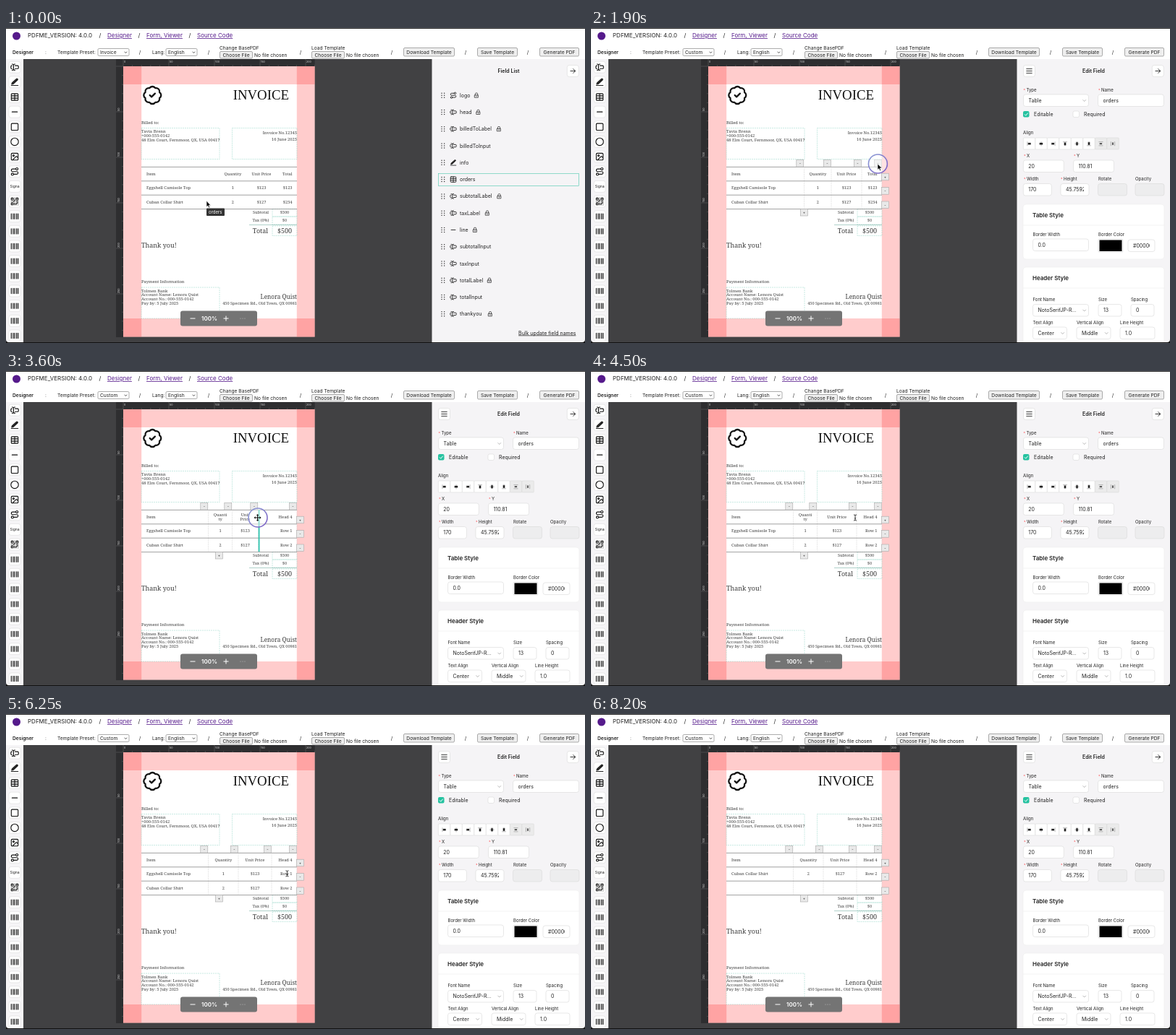
Recreate the animation shown at these times as an HTML page. Size 800 px wide and 436 px high, loop 8400 ms.

```html
<!DOCTYPE html>
<html lang="en">
<head>
<meta charset="utf-8">
<title>Invoice table editing</title>
<style>
  html, body { margin: 0; width: 100%; height: 100%; overflow: hidden; background: #fff; }
  svg { display: block; }
  text { font-family: Inter, "Liberation Sans", sans-serif; fill: #222; white-space: pre; }
  .serif text { font-family: "Noto Serif", "Liberation Serif", serif; fill: #3c3c3c; }
  .serif .title { font-family: "Liberation Serif", "Noto Serif", serif; fill: #111; }
  .bold { font-weight: 600; }
  .mid { text-anchor: middle; }
  .end { text-anchor: end; }
  .link { fill: #551a8b; text-decoration: underline; }
  .white { fill: #fff; }
  .pale { fill: #ddd; }
  .star { fill: #ff4d4f; }
  .icon { fill: none; stroke: #111; stroke-linecap: round; stroke-linejoin: round; }
  .solid { fill: #222; stroke: #222; }
  .dash { fill: none; stroke: #9bd8cc; stroke-width: .55; stroke-dasharray: 2 1; }
</style>
</head>
<body>
<svg id="stage" width="800" height="436" viewBox="0 0 800 436"></svg>
<script>
const LOOP = 8400, STEP = 50, TEAL = '#25c2a0';

// ---------- drawing helpers ----------
const text = (x, y, s, size = 7, cls = '') =>
  `<text x="${x}" y="${y}" font-size="${size}" class="${cls}">${s}</text>`;
const rect = (x, y, w, h, fill, stroke = 'none', r = 0, extra = '') =>
  `<rect x="${x}" y="${y}" width="${w}" height="${h}" fill="${fill}" stroke="${stroke}" stroke-width=".6" rx="${r}" ${extra}/>`;
const path = (d, stroke, width = .7, extra = '') =>
  `<path d="${d}" fill="none" stroke="${stroke}" stroke-width="${width}" ${extra}/>`;
const dot = (x, y, r, fill) => `<circle cx="${x}" cy="${y}" r="${r}" fill="${fill}"/>`;
const dash = (x, y, w, h) => `<rect x="${x}" y="${y}" width="${w}" height="${h}" class="dash"/>`;
const icon = (d, cx, cy, size, weight = 2, cls = '') =>
  `<path class="icon ${cls}" d="${d}" stroke-width="${weight}" transform="translate(${cx - size / 2} ${cy - size / 2}) scale(${size / 24})"/>`;
const ringPath = (x, y, r) => `M${x - r} ${y}a${r} ${r} 0 1 0 ${2 * r} 0a${r} ${r} 0 1 0 ${-2 * r} 0`;

const ICON = {
  text: 'M5 4h1a3 3 0 0 1 3 3 3 3 0 0 1 3-3h1M13 20h-1a3 3 0 0 1-3-3 3 3 0 0 1-3 3H5M5 16H4a2 2 0 0 1-2-2v-4a2 2 0 0 1 2-2h1M13 8h7a2 2 0 0 1 2 2v4a2 2 0 0 1-2 2h-7M9 7v10',
  pen: 'M3 21h18M16.5 3.5a2.1 2.1 0 0 1 3 3L8 17l-4 1 1-4Z',
  table: 'M5 3h14a2 2 0 0 1 2 2v14a2 2 0 0 1-2 2H5a2 2 0 0 1-2-2V5a2 2 0 0 1 2-2ZM3 9h18M3 15h18M12 3v18',
  line: 'M5 12h14',
  square: 'M5 3h14a2 2 0 0 1 2 2v14a2 2 0 0 1-2 2H5a2 2 0 0 1-2-2V5a2 2 0 0 1 2-2Z',
  circle: ringPath(12, 12, 10),
  route: ringPath(6, 19, 3) + ringPath(18, 5, 3) + 'M9 19h8.5a3.5 3.5 0 0 0 0-7h-11a3.5 3.5 0 0 1 0-7H15',
  grid: 'M3 3h5v5H3ZM16 3h5v5h-5ZM3 16h5v5H3ZM21 16h-3a2 2 0 0 0-2 2v3M12 7v3a2 2 0 0 1-2 2H7M12 3h.01M12 16v5M16 12h5M3 12h.01M21 21h.01',
  bars: 'M3 5v14M8 5v14M12 5v14M17 5v14M21 5v14',
  lock: 'M5 11h14v10H5ZM7 11V7a5 5 0 0 1 10 0v4M12 15v2',
  badge: 'M3.85 8.62a4 4 0 0 1 4.78-4.77 4 4 0 0 1 6.74 0 4 4 0 0 1 4.78 4.78 4 4 0 0 1 0 6.74 4 4 0 0 1-4.77 4.78 4 4 0 0 1-6.75 0 4 4 0 0 1-4.78-4.77 4 4 0 0 1 0-6.76ZM9 12l2 2 4-4',
  arrow: 'M4 12h16M13 5l7 7-7 7',
  menu: 'M3 5h18M3 12h18M3 19h18',
  down: 'M5 9l7 7 7-7'
};
ICON.image = ICON.square + ringPath(9, 9, 2) + 'M21 15l-3.1-3.1a2 2 0 0 0-2.8 0L6 21';
const glyph = (name, cx, cy, size, weight) => icon(ICON[name], cx, cy, size, weight, name === 'pen' ? 'solid' : '');

// ---------- page header ----------
function header() {
  const slash = (x, y, s) => text(x, y, '/', s, 'mid');
  const button = (x, y, w, h, label) =>
    rect(x, y, w, h, '#efefef', '#767676', 1.5) + text(x + w / 2, y + h / 2 + 2.4, label, 6.67, 'mid');
  const select = (x, label) =>
    rect(x, 28.5, 43, 10, '#fff', '#767676', 1.5) + label + icon(ICON.down, x + 38.5, 33.7, 5, 3.5);
  const file = (x, label) =>
    text(x, 30, label, 6.67) + button(x + .5, 32.5, 45, 9.5, 'Choose File') + text(x + 48, 40, 'No file chosen', 6.67);
  return rect(0, 0, 800, 43, '#fff')
    + dot(14.5, 11, 5.5, '#551a8b')
    + text(30, 13, 'PDFME_VERSION: 4.0.0', 8)
    + [130, 184, 254].map(x => slash(x, 13, 8)).join('')
    + text(140, 13, 'Designer', 8, 'link') + text(194, 13, 'Form, Viewer', 8, 'link') + text(264, 13, 'Source Code', 8, 'link')
    + text(9, 36, 'Designer', 6.67, 'bold') + text(54, 36, ':', 6.67) + text(71, 36, 'Template Preset:', 6.67)
    + select(127, '<text id="preset" x="130" y="36" font-size="6.67"></text>')
    + text(202, 36, 'Lang:', 6.67) + select(221, text(224, 36, 'English', 6.67))
    + [185, 280, 407, 533, 635, 721].map(x => slash(x, 36, 7)).join('')
    + file(295, 'Change BasePDF') + file(422, 'Load Template')
    + button(549.5, 27.5, 70, 11.5, 'Download Template')
    + button(651.5, 27.5, 55, 11.5, 'Save Template')
    + button(737.5, 27.5, 54, 11.5, 'Generate PDF');
}

// ---------- tool column ----------
function tools() {
  const names = ['text', 'pen', 'table', 'line', 'square', 'circle', 'image', 'route', '', 'grid'];
  let out = rect(0, 43, 24, 393, '#f6f5f7');
  for (let i = 0; i < 19; i++) {
    const y = 54.2 + i * 20.65;
    out += rect(4, y - 8, 16, 16, '#fff', '#dcdcdc', 3);
    out += i === 8 ? text(12, y + 1.8, 'Signa', 5, 'mid') : glyph(names[i] || 'bars', 12, y, 12.5, 2.2);
  }
  return out;
}

// ---------- canvas and invoice ----------
function rulers() {
  let out = rect(152, 43, 274.6, 10, '#2e2e30') + rect(152, 43, 10, 385, '#2e2e30'), ticks = '';
  for (let mm = 0; mm <= 295; mm += 10) {
    const d = mm * 1.26, big = mm % 50 === 0, len = big ? 10 : 2;
    if (mm <= 210) ticks += `M${162 + d} 53v${-len}`;
    ticks += `M162 ${53 + d}h${-len}`;
    if (big && mm <= 200) out += text(163 + d, 47.5, mm, 3.6, 'pale');
    if (big && mm) out += `<g transform="translate(156.5 ${52 + d}) rotate(-90)">${text(0, 0, mm, 3.6, 'pale')}</g>`;
  }
  return out + path(ticks, '#777', .4);
}

function invoice() {
  const lines = (x, y, gap, list) => list.map((s, i) => text(x, y + i * gap, s, 5.8)).join('');
  const pink = (x, y, w, h) => rect(x, y, w, h, 'rgba(255,0,0,.2)');
  return rect(24, 43, 565, 393, '#414143') + rulers()
    + rect(162, 53, 264.6, 374.5, '#fff')
    + pink(162, 53, 25.2, 374.5) + pink(401.8, 53, 24.8, 374.5) + pink(162, 53, 264.6, 25) + pink(162, 402, 264.6, 25.5)
    + dash(187, 138.5, 108, 43) + dash(312.5, 138.5, 89.5, 43) + dash(187, 359, 108, 43)
    + dash(368, 250.5, 34, 10.5) + dash(368, 261, 34, 11) + dash(368, 274, 34, 13.5)
    + path('M336 272.5H402', '#8fbdb4', .7)
    + icon(ICON.badge, 202.3, 93, 28.8, 1.9)
    + '<g class="serif">'
    + text(352.3, 98.5, 'INVOICE', 18.8, 'mid title')
    + text(187, 132.5, 'Billed to:', 5.8)
    + lines(187, 145, 6, ['Tavia Brenn', '+000-555-0142', '48 Elm Court, Fernmoor, QX, USA 00417'])
    + text(402, 147, 'Invoice No.12345', 5.8, 'end') + text(402, 155.7, '16 June 2025', 5.8, 'end')
    + text(352, 257.2, 'Subtotal', 5.6, 'mid') + text(352, 267.6, 'Tax (0%)', 5.6, 'mid') + text(351.5, 283.6, 'Total', 9, 'mid')
    + text(385, 257.2, '$500', 5.6, 'mid') + text(385, 267.6, '$0', 5.6, 'mid') + text(385, 283.6, '$500', 9, 'mid')
    + text(187, 304.3, 'Thank you!', 9)
    + text(187, 353, 'Payment Information', 5.8)
    + lines(187, 365.5, 5.9, ['Tolmen Bank', 'Account Name: Lenora Quist', 'Account No.: 000-555-0142', 'Pay by: 5 July 2025'])
    + text(402, 375, 'Lenora Quist', 8.2, 'end')
    + text(402, 383.2, '450 Specimen Rd., Old Town, QX 00981', 5.6, 'end')
    + '</g>';
}

function zoomBar() {
  return rect(241, 391.5, 106, 21, '#747474', 'none', 3)
    + path('M254.5 402h7M300.5 402h7M304 398.5v7', '#fff', 1)
    + text(281, 405, '100%', 8, 'mid bold white')
    + [324, 327, 330].map(x => dot(x, 402, .6, '#bbb')).join('');
}

// ---------- right panel ----------
const squareButton = (x, d) => rect(x, 51.5, 16, 16, '#fff', '#d9d9d9', 3) + icon(d, x + 8, 59.5, 10);

function fieldList() {
  // name, icon, x of the lock if there is one
  const fields = [['logo', 'route', 650], ['head', 'text', 652.5], ['billedToLabel', 'text', 681], ['billedToInput', 'text'],
    ['info', 'pen'], ['orders', 'table'], ['subtotalLabel', 'text', 681.5], ['taxLabel', 'text', 665], ['line', 'line', 648],
    ['subtotalInput', 'text'], ['taxInput', 'text'], ['totalLabel', 'text', 668], ['totalInput', 'text'], ['thankyou', 'text', 669]];
  return text(694.5, 62, 'Field List', 7, 'mid bold')
    + rect(597.5, 201.3, 194, 17, 'none', '#4cc9ae')
    + fields.map(([name, kind, lockX], i) => {
      const y = 93.2 + i * 23.28;
      let dots = '';
      for (let k = 0; k < 6; k++) dots += dot(602 + k % 2 * 3.6, y - 3 + (k >> 1) * 3, .75, '#333');
      return dots + glyph(kind, 618, y, 10) + text(627, y + 2.5, name) + (lockX ? glyph('lock', lockX, y, 8) : '');
    }).join('')
    + `<text x="787.5" y="424.5" font-size="7" class="end" text-decoration="underline">Bulk update field names</text>`;
}

function editForm() {
  const label = (x, y, s, star) => (star ? text(x, y, '*', 5, 'star') : '') + text(x + (star ? 4 : 0), y, s, 6);
  const input = (x, y, w, value, id = '') => rect(x, y, w, 16.5, '#fff', '#d9d9d9', 3)
    + `<svg x="${x}" y="${y}" width="${w - 7}" height="16.5" overflow="hidden"><text x="7" y="10.8" font-size="7" ${id && `id="${id}"`}>${value}</text></svg>`;
  const select = (x, y, w, value) => input(x, y, w, value) + path(`M${x + w - 8} ${y + 7.3}l2.2 2.2 2.2-2.2`, '#999', .7);
  const off = x => rect(x, 215.5, 40, 16.5, '#ededee', '#d9d9d9', 3);
  const card = (y, h, title) => rect(597, y, 195, h, '#fff', '#ececec', 4)
    + text(610, y + 17.7, title, 8, 'bold') + path(`M597 ${y + 29}H792`, '#eee');
  const aligns = ['M3 3v18M7 8h12v8H7Z', 'M12 2v20M5 8h14v8H5Z', 'M21 3v18M5 8h12v8H5Z', 'M3 3h18M8 7v12h8V7Z',
    'M2 12h20M8 5v14h8V5Z', 'M3 21h18M8 5v12h8V5Z', 'M3 3h18M3 21h18M7 10h10v4H7Z', 'M3 3v18M21 3v18M10 7v10h4V7Z'];
  return squareButton(597.5, ICON.menu) + text(694.5, 62, 'Edit Field', 7, 'mid bold')
    + label(597.5, 87.5, 'Type', 1) + select(597.5, 92, 90, 'Table')
    + label(701, 87.5, 'Name', 1) + input(700.5, 92, 91, 'orders')
    + rect(597, 115, 8.5, 8.5, TEAL, 'none', 2) + path('M599 119.4l1.7 1.8 3-3.6', '#fff', 1)
    + text(612, 122, 'Editable') + rect(666, 115, 8.5, 8.5, '#fff', '#d9d9d9', 2) + text(681, 122, 'Required')
    + label(597, 147.4, 'Align')
    + aligns.map((d, i) => rect(597.3 + i * 16.5, 152, 16.5, 16, i > 5 ? '#ebebeb' : '#fff', '#d9d9d9', 1)
      + icon(d, 605.5 + i * 16.5, 160.2, 7, 1, 'solid')).join('')
    + label(598, 178.5, 'X', 1) + input(597.3, 183, 56, '20')
    + label(667, 178.5, 'Y', 1) + input(666.5, 183, 56, '110.81')
    + label(598, 210.5, 'Width', 1) + input(597.3, 215.5, 39, '170')
    + label(649, 210.5, 'Height', 1) + input(649, 215.5, 39, '', 'height')
    + label(701, 210.5, 'Rotate') + off(700.5) + label(752, 210.5, 'Opacity') + off(752)
    + card(244, 76, 'Table Style')
    + label(610.5, 287.5, 'Border Width') + input(610.5, 292, 77, '0.0')
    + label(701, 287.5, 'Border Color') + rect(701, 292, 34, 18.5, '#fff', '#d9d9d9', 2) + rect(702.5, 293.5, 31, 15.5, '#000')
    + input(742, 293, 37, '#000000')
    + card(331, 110, 'Header Style')
    + label(610.5, 378, 'Font Name') + select(610.5, 382.5, 77, 'NotoSerifJP-R...')
    + label(701, 378, 'Size') + input(701, 382.5, 32, '13')
    + label(746, 378, 'Spacing') + input(746, 382.5, 32, '0')
    + label(610.5, 410, 'Text Align') + select(610.5, 414, 47, 'Center')
    + label(671, 410, 'Vertical Align') + select(671, 414, 47, 'Middle')
    + label(731, 410, 'Line Height') + input(731, 414, 48, '1.0');
}

// ---------- timeline ----------
const SELECT = 450, EDIT = 1100, CUT_COL = 2200, ADD_COL = 3050, DROP_A = 4000, DROP_B = 5750, CUT_ROW = 6700, ADD_ROW = 7600, GONE = 8200;
const LEFT = 187, RIGHT = 402, TOP = 192, ROW = 19.4;
const layouts = [[0, [294.5, 332, 374, RIGHT]], [CUT_COL, [310.5, 354, RIGHT]], [ADD_COL, [279.5, 312.5, 348.5, RIGHT]],
  [DROP_A, [279.5, 312.5, 367, RIGHT]], [DROP_B, [279.5, 321, 367, RIGHT]]];
// time, x, y, pointer shape
const moves = [[0, 277, 239.3, 'arrow'], [450, 278.3, 237, 'arrow'], [1400, 278.3, 237, 'arrow'], [1750, 396, 188, 'arrow'],
  [2250, 396, 188, 'arrow'], [2650, 406, 205, 'arrow'], [3100, 406, 205, 'arrow'], [3450, 346.5, 203, 'move'],
  [3550, 346.5, 203, 'move'], [3600, 347.6, 203, 'move'], [3900, 365, 203, 'move'], [4500, 365, 203, 'beam'],
  [5250, 309, 204, 'beam'], [5350, 309, 204, 'beam'], [5450, 314, 204, 'beam'], [5700, 317.5, 204, 'beam'],
  [6000, 317.5, 204, 'beam'], [6350, 406, 225, 'arrow'], [6950, 406, 225, 'beam'], [7100, 312, 228, 'beam'],
  [7250, 294, 235, 'arrow'], [LOOP, 294, 235, 'arrow']];
const presses = [[200, 300], [900, 950], [1000, 1100], [1850, 2100], [2800, 2950], [3550, 3950], [5350, 5700], [6400, 6550], [7350, 7500]];
// start, end, pointer x at the grab, column edge
const drags = [[3550, DROP_A, 346.5, 348.5], [5350, DROP_B, 309, 312.5]];

function pointerAt(t) {
  let i = 0;
  while (i < moves.length - 2 && t >= moves[i + 1][0]) i++;
  const a = moves[i], b = moves[i + 1], p = (t - a[0]) / (b[0] - a[0]), e = p * p * (3 - 2 * p);
  return { x: a[1] + (b[1] - a[1]) * e, y: a[2] + (b[2] - a[2]) * e, kind: a[3] };
}

function pointer(t, c) {
  if (t >= GONE) return '';
  let out = '';
  if (presses.some(([a, b]) => t >= a && t < b))
    out += `<circle cx="${c.x + .4}" cy="${c.y}" r="13" fill="#fff" fill-opacity=".45" stroke="url(#ring)" stroke-width="1.6"/>`;
  const shapes = {
    arrow: '<path d="M0 0V8.3L1.9 6.6 3.2 9.5 4.6 8.9 3.3 6.1H5.8Z" fill="#000" stroke="#fff" stroke-width=".6"/>',
    beam: path('M-2-4Q0-4 0-3Q0-4 2-4M0-3V3M-2 4Q0 4 0 3Q0 4 2 4M-1 1H1', '#222', .9),
    move: path('M-4 0H4M0-4V4', '#111', 1.1) + '<path d="M-5 0l2-1.7v3.4ZM5 0l-2-1.7v3.4ZM0-5l-1.7 2h3.4ZM0 5l-1.7-2h3.4Z" fill="#111"/>'
  };
  const fade = Math.min(1, (GONE - t) / 300);
  return `${out}<g transform="translate(${c.x} ${c.y})" opacity="${fade}">${shapes[c.kind]}</g>`;
}

function tableRows(t) {
  const last = t < ADD_COL ? ['$123', '$254'] : ['Row 1', 'Row 2'];
  const shirts = ['Cuban Collar Shirt', '2', '$127', last[1]];
  if (t < CUT_ROW) return [['Eggshell Camisole Top', '1', '$123', last[0]], shirts];
  return t < ADD_ROW ? [shirts] : [shirts, ['', '', '', '']];
}

function table(t, c) {
  const cols = layouts.filter(l => t >= l[0]).pop()[1];
  const rows = [['Item', 'Quantity', 'Unit Price', t < ADD_COL ? 'Total' : 'Head 4'], ...tableRows(t)];
  const bottom = TOP + rows.length * ROW, editing = t >= EDIT, selected = t >= SELECT && !editing;
  const wraps = { Quantity: [35, 'Quanti', 'ty'], 'Unit Price': [40, 'Unit', 'Price'] };
  let out = '', rules = '';
  for (let i = 0; i <= rows.length; i++) rules += `M${LEFT} ${TOP + i * ROW + .4}H${RIGHT}`;
  out += path(rules, '#8a8a8a', .8);
  if (editing) out += path(cols.map(x => `M${x} ${TOP}V${bottom}`).join(''), '#c4c4c4', .5, 'stroke-dasharray="1.5 1"');

  out += '<g class="serif">';
  rows.forEach((row, r) => cols.forEach((right, k) => {
    const y = TOP + r * ROW + 11.9, left = k ? cols[k - 1] : LEFT, mid = (left + right) / 2, wrap = wraps[row[k]];
    if (wrap && right - left < wrap[0]) out += text(mid, y - 3, wrap[1], 5.7, 'mid') + text(mid, y + 3, wrap[2], 5.7, 'mid');
    else if (k === 0) out += text(194, y, row[k], 5.8);
    else if (k === 3) out += text(right - 6.5, y, row[k], 5.7, 'end');
    else out += text(mid, y, row[k], 5.7, 'mid');
  }));
  out += '</g>';

  if (selected) {
    const xs = [LEFT + .5, 294.5, RIGHT], ys = [TOP + .5, TOP + ROW * 1.5, bottom];
    out += rect(LEFT + .5, TOP + .4, RIGHT - LEFT - .5, bottom - TOP, 'none', TEAL, 0, 'stroke-opacity=".6"');
    xs.forEach((x, i) => ys.forEach((y, j) => {
      if (i !== 1 || j !== 1) out += dot(x, y, 1.9, TEAL);
    }));
    out += '<circle cx="294.5" cy="221.3" r="2" fill="#ffd0d0" stroke="#f55" stroke-width=".8"/>'
      + rect(404.5, 193, 9, 8.5, TEAL) + path('M407.3 195.6l3.4 3.4m0-3.4l-3.4 3.4', '#fff', .8);
  }
  if (editing) {
    const key = (x, y, sign) => rect(x - 5, y - 4.8, 10, 9.6, '#e9e9e9', '#a8a8a8') + text(x, y + 1.7, sign, 5, 'mid');
    cols.forEach(x => { out += key(x - 5.7, 187.3, '-'); });
    rows.forEach((_, r) => { out += key(406.5, TOP + (r + 1) * ROW - 5.4, r ? '-' : '+'); });
    out += key(294.3, bottom + 5, '+');
  }
  for (const [from, to, grab, edge] of drags)
    if (t >= from && t < to) out += path(`M${edge + c.x - grab} ${TOP}V${bottom}`, '#2fc6b0', 1.8);
  if (t < SELECT)
    out += rect(c.x, c.y + 10.2, 25, 10.5, '#333', 'none', 1) + text(c.x + 12.3, c.y + 17.4, 'orders', 6, 'mid white');
  return out;
}

// ---------- assembly ----------
const stage = document.getElementById('stage');
stage.innerHTML = `<defs><linearGradient id="ring" x1="0" y1="0" x2="1" y2="1">
    <stop offset="0" stop-color="#8d9fd6"/><stop offset="1" stop-color="#7a5cc4"/></linearGradient></defs>`
  + header() + invoice() + '<g id="table"></g>' + zoomBar() + tools()
  + rect(588.5, 43, 211.5, 393, '#f5f4f6') + squareButton(775.3, ICON.arrow)
  + `<g id="list">${fieldList()}</g><g id="form">${editForm()}</g>`
  + '<g id="pointer"></g>'
  + rect(0, 0, 800, 1, '#222')
  + '<path d="M0 431Q0 435 4 435H796Q800 435 800 431V436H0Z" fill="#111"/>';

const $ = id => document.getElementById(id);
let shown = -1;

function draw(now) {
  const t = Math.floor((now % LOOP) / STEP) * STEP;
  if (t === shown) return;
  shown = t;
  const c = pointerAt(t), open = t >= SELECT;
  $('table').innerHTML = table(t, c);
  $('pointer').innerHTML = pointer(t, c);
  $('list').style.display = open ? 'none' : '';
  $('form').style.display = open ? '' : 'none';
  $('preset').textContent = t < EDIT ? 'Invoice' : 'Custom';
  $('height').textContent = t >= CUT_ROW && t < ADD_ROW ? '30.1728' : '45.7592';
}

const start = performance.now();
function tick() {
  draw(performance.now() - start);
  requestAnimationFrame(tick);
}
tick();
</script>
</body>
</html>
```
